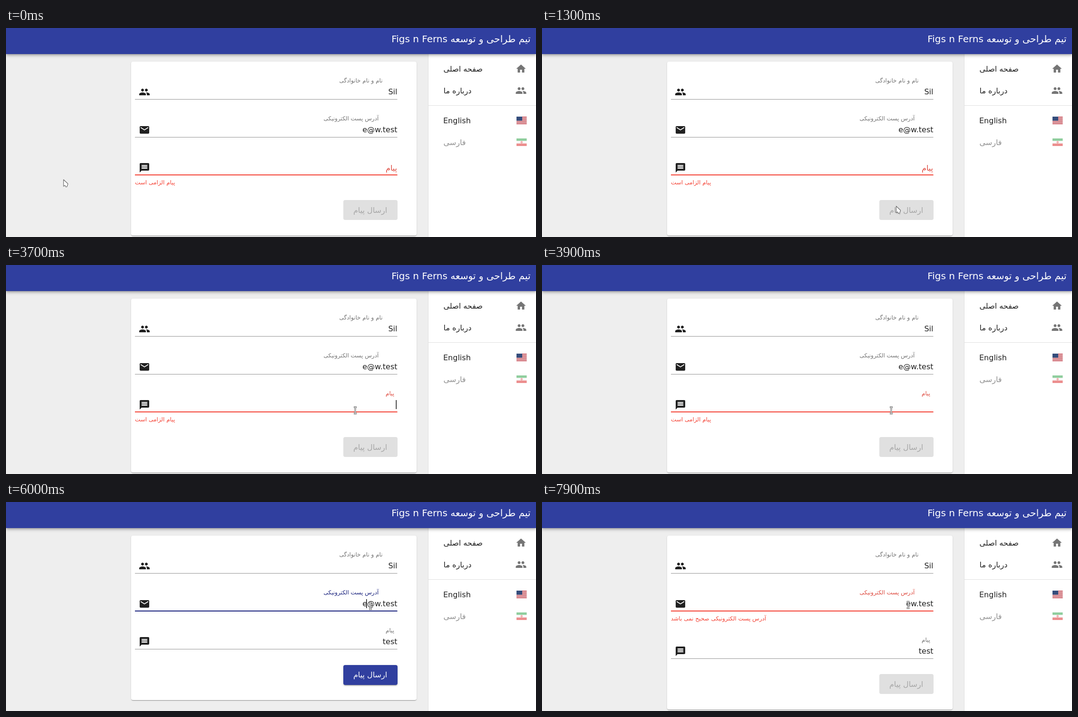
An HTML page that plays this animation: 1114x441 px, repeating every 8000 ms.

```html
<!DOCTYPE html>
<html lang="fa">
<head>
<meta charset="utf-8">
<title>Contact form</title>
<style>
html, body { margin: 0; width: 100%; height: 100%; overflow: hidden; background: #eee; }
div, svg { position: absolute; }
#drawer { left: 887px; top: 55px; width: 226px; height: 386px; background: #fff; border-left: 1px solid #e0e0e0; }
#header { left: 0; top: 0; width: 1114px; height: 55px; background: #303f9f;
  box-shadow: 0 2px 4px -1px rgba(0,0,0,.2), 0 4px 5px rgba(0,0,0,.14), 0 1px 10px rgba(0,0,0,.12); }
#card { left: 263px; top: 71px; width: 599.5px; background: #fff; border-radius: 4px;
  box-shadow: 0 2px 1px -1px rgba(0,0,0,.2), 0 1px 1px rgba(0,0,0,.14), 0 1px 3px rgba(0,0,0,.12); }
#button { left: 708.5px; width: 114px; height: 42px; border-radius: 4px; }
svg { left: 0; top: 0; }
text { font: 16px "DejaVu Sans", sans-serif; fill: #212121; white-space: pre; }
.small { font-size: 12px; }
.title { font-size: 20px; fill: #fff; direction: rtl; }
.label { fill: #757575; }
.error { fill: #f44336; }
.end { text-anchor: end; }
.line { fill: #949494; }
</style>
</head>
<body>
<div id="card"></div>
<div id="button"></div>
<div id="drawer"></div>
<div id="header"></div>
<svg width="1114" height="441" viewBox="0 0 1114 441">
  <defs>
    <path id="people" d="M16 11c1.66 0 2.99-1.34 2.99-3S17.66 5 16 5s-3 1.34-3 3 1.34 3 3 3zm-8 0c1.66 0 2.99-1.34 2.99-3S9.66 5 8 5 5 6.34 5 8s1.34 3 3 3zm0 2c-2.33 0-7 1.17-7 3.5V19h14v-2.5c0-2.33-4.67-3.5-7-3.5zm8 0c-.29 0-.62.02-.97.05C16.19 13.89 17 15.02 17 16.5V19h6v-2.5c0-2.33-4.67-3.5-7-3.5z"/>
  </defs>

  <text class="title" x="1102.5" y="30">تیم طراحی و توسعه Figs n Ferns</text>

  <g fill="#757575">
    <path transform="translate(1070.5 74)" d="M10 20v-6h4v6h5v-8h3L12 3 2 12h3v8z"/>
    <use href="#people" x="1070.5" y="120"/>
  </g>
  <text x="919.5" y="92">صفحه اصلی</text>
  <text x="919.5" y="138">درباره ما</text>
  <rect x="888" y="163" width="226" height="1" fill="#e0e0e0"/>
  <text x="919" y="201">English</text>
  <text x="919.5" y="247" opacity=".5">فارسی</text>
  <g id="usa" transform="translate(1073 187)"></g>
  <g transform="translate(1073 233)" opacity=".5">
    <path fill="#239f40" d="M0 0h21.5v5.3H0z"/>
    <path fill="#f4f4f4" d="M0 5.3h21.5v5.4H0z"/>
    <path fill="#da2020" d="M0 10.7h21.5V16H0z"/>
    <circle cx="10.75" cy="8" r="1.9" fill="none" stroke="#da2020" stroke-width=".9"/>
    <path stroke="#da2020" d="M10.75 5.8v4.4"/>
  </g>

  <text class="small label" x="700.5" y="115">نام و نام خانوادگی</text>
  <text class="end" x="822.5" y="140">Sil</text>
  <use href="#people" x="279" y="123" fill="#212121"/>
  <rect class="line" x="271" y="150" width="551.5" height="1"/>

  <text id="mailLabel" class="small" x="667.5" y="195">آدرس پست الکترونیکی</text>
  <text id="mail" class="end" x="822.5" y="220"></text>
  <path transform="translate(279 203)" fill="#212121" d="M20 4H4c-1.1 0-1.99.9-1.99 2L2 18c0 1.1.9 2 2 2h16c1.1 0 2-.9 2-2V6c0-1.1-.9-2-2-2zm0 4l-8 5-8-5V6l8 5 8-5v2z"/>
  <rect class="line" x="271" y="230" width="551.5" height="1"/>
  <rect id="mailLine" y="229" height="2"/>
  <text id="mailError" class="small error" x="271" y="250">آدرس پست الکترونیکی صحیح نمی باشد</text>

  <g id="message">
    <text id="noteLabel">پیام</text>
    <text id="note" class="end" x="822.5" y="300"></text>
    <path transform="translate(279 283)" fill="#212121" d="M20 2H4c-1.1 0-1.99.9-1.99 2L2 22l4-4h14c1.1 0 2-.9 2-2V4c0-1.1-.9-2-2-2zm-2 12H6v-2h12v2zm0-3H6V9h12v2zm0-3H6V6h12v2z"/>
    <rect class="line" x="271" y="310" width="551.5" height="1"/>
    <rect id="noteLine" y="309" height="2"/>
    <text id="noteError" class="small error" x="271" y="330">پیام الزامی است</text>
  </g>

  <text id="send" x="765.5" text-anchor="middle">ارسال پیام</text>
  <rect id="caret" width="1.5" height="19" fill="#111"/>
  <path id="arrow" fill="#fff" stroke="#6b6b6b" stroke-width="1.2" stroke-linejoin="round" d="M0 0V14L3 12 5 15.5 7 15 9 9.5V8.5z"/>
  <g id="beam" fill="none">
    <path stroke="#858585" stroke-width="3.4" d="M-3 -7H3M0 -7V6M-3 6.5H3"/>
    <path stroke="#e4e4e4" stroke-width="1.2" d="M-2 -7H2M0 -7V6M-2 6.5H2"/>
  </g>
</svg>
<script>
const LOOP = 8000, STEP = 100;
const NAVY = '#1a237e', RED = '#f44336', LABEL_RED = '#de4a3f', GREY = '#757575';
const FOCUS_NOTE = 2300, FOCUS_MAIL = 5700, ERASE = 6940;
const KEYS = [4100, 4250, 4350, 4450];
// time, x, y of the pointer
const PATH = [
  [200, 121, 320], [900, 744.5, 376], [1500, 744.5, 376], [2000, 734, 307],
  [4800, 734, 307], [5200, 690, 268], [5600, 766, 219.5], [6100, 766, 219.5], [6500, 769.5, 217.5]
];

const $ = id => document.getElementById(id);
const set = (id, attrs) => {
  for (const k in attrs) $(id).setAttribute(k, attrs[k]);
};
const show = (id, on) => set(id, { visibility: on ? 'visible' : 'hidden' });
const clamp = v => Math.min(1, Math.max(0, v));
const mix = (a, b, k) => a + (b - a) * k;
const smooth = k => k * k * (3 - 2 * k);

// cubic-bezier(.25, .8, .25, 1)
function swift(x) {
  if (x <= 0 || x >= 1) return clamp(x);
  const curve = (s, a, b) => 3 * (1 - s) ** 2 * s * a + 3 * (1 - s) * s * s * b + s ** 3;
  let lo = 0, hi = 1;
  for (let i = 0; i < 20; i++) {
    const mid = (lo + hi) / 2;
    if (curve(mid, .25, .25) < x) lo = mid; else hi = mid;
  }
  return curve(lo, .8, 1);
}

function pointer(t) {
  let i = 0;
  while (i < PATH.length - 2 && t > PATH[i + 1][0]) i++;
  const [t0, x0, y0] = PATH[i], [t1, x1, y1] = PATH[i + 1];
  const k = smooth(clamp((t - t0) / (t1 - t0)));
  return [mix(x0, x1, k), mix(y0, y1, k)];
}

function underline(id, on, color, grow) {
  const w = 551.5 * mix(.5, 1, grow);
  show(id, on);
  set(id, { x: 546.75 - w / 2, width: w, fill: color });
}

function drawMail(t, bad) {
  const focused = t >= FOCUS_MAIL;
  $('mail').textContent = bad ? 'ew.test' : 'e@w.test';
  set('mailLabel', { fill: bad ? LABEL_RED : focused ? NAVY : GREY });
  $('mailLabel').style.fill = bad ? LABEL_RED : focused ? NAVY : GREY;
  underline('mailLine', focused, bad ? RED : NAVY, swift((t - FOCUS_MAIL) / 300));
  show('mailError', bad);
}

function drawNote(t, empty, shift) {
  const focused = t >= FOCUS_NOTE && t < FOCUS_MAIL;
  const up = swift((t - FOCUS_NOTE) / 400);
  set('message', { transform: `translate(0 ${shift})` });
  set('noteLabel', { transform: `translate(798 ${mix(301, 275, up)}) scale(${mix(1, .75, up)})` });
  $('noteLabel').style.fill = empty ? LABEL_RED : focused ? NAVY : GREY;
  $('note').textContent = 'test'.slice(0, KEYS.filter(k => t >= k).length);
  underline('noteLine', empty || focused, empty ? RED : NAVY, 1);
  show('noteError', empty);
}

function drawButton(t, invalid) {
  const on = swift((t - KEYS[0]) / 400) * (1 - swift((t - ERASE) / 400));
  const top = invalid ? 363 : 343.5;
  const rgb = [48, 63, 159].map(c => Math.round(mix(224, c, on)));
  const s = $('button').style;
  s.top = top + 'px';
  s.background = `rgb(${rgb})`;
  s.boxShadow = `0 3px 1px -2px rgba(0,0,0,${.2 * on}), 0 2px 2px rgba(0,0,0,${.14 * on}), 0 1px 5px rgba(0,0,0,${.12 * on})`;
  set('send', { y: invalid ? 390 : 370 });
  $('send').style.fill = invalid ? 'rgba(0,0,0,.26)' : '#fff';
}

function drawCaret(t, bad) {
  const last = [FOCUS_NOTE, ...KEYS, FOCUS_MAIL, ERASE].filter(k => t >= k).pop();
  show('caret', last !== undefined && Math.floor((t - last) / 500) % 2 === 0);
  set('caret', t < FOCUS_MAIL ? { x: 819.5, y: 285 } : { x: bad ? 772.5 : 757, y: 205 });
}

function drawPointer(t) {
  const [x, y] = pointer(t);
  const inField = x > 271 && x < 822 && (y > 265 && y < 312 || y > 185 && y < 232);
  show('arrow', !inField);
  show('beam', inField);
  set('arrow', { transform: `translate(${x} ${y})` });
  set('beam', { transform: `translate(${x} ${y})` });
}

function draw(t) {
  const empty = t < KEYS[0], bad = t >= ERASE;
  $('card').style.height = (empty || bad ? 366.5 : 346.5) + 'px';
  drawMail(t, bad);
  drawNote(t, empty, bad ? 20 : 0);
  drawButton(t, empty || bad);
  drawCaret(t, bad);
  drawPointer(t);
}

function buildFlag() {
  const h = 16 / 13;
  let out = '<path fill="#f4f4f4" d="M0 0h21.5v16H0z"/>';
  for (let i = 0; i < 13; i += 2) out += `<rect y="${i * h}" width="21.5" height="${h}" fill="#c0303c"/>`;
  out += '<path fill="#344d7c" d="M0 0h12v8.6H0z"/>';
  $('usa').innerHTML = out;
}

buildFlag();
draw(0);
let start;
function tick(now) {
  start ??= now;
  draw(Math.floor((now - start) % LOOP / STEP) * STEP);
  requestAnimationFrame(tick);
}
requestAnimationFrame(tick);
</script>
</body>
</html>
```
